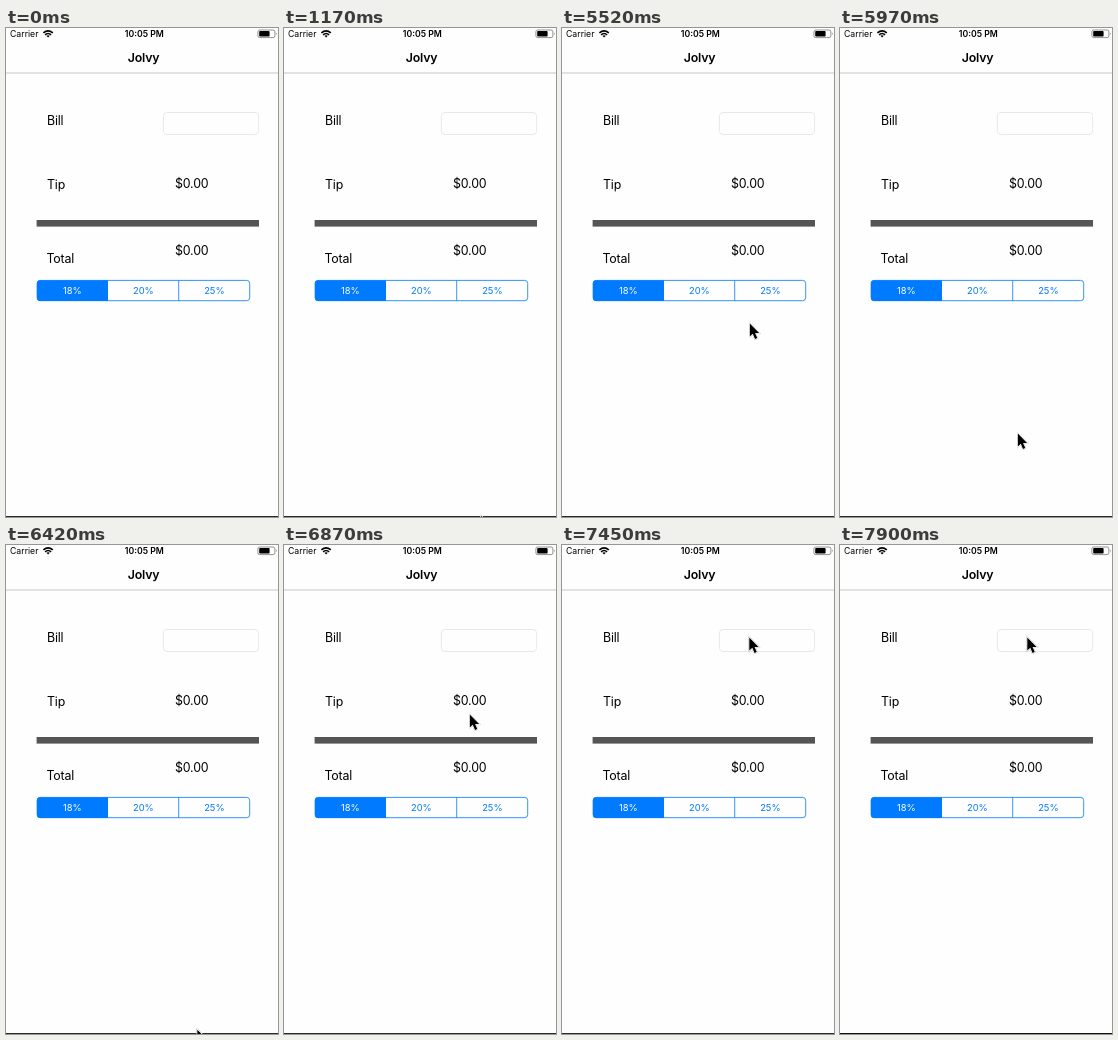
These frames come from a looping animation (272x489 px, 8000 ms). An HTML page:

```html
<!DOCTYPE html>
<html lang="en">
<head>
<meta charset="utf-8">
<title>Tip calculator</title>
<style>
  html, body { margin: 0; width: 100%; height: 100%; overflow: hidden; background: #fefefe; }
  svg { display: block; font: 12.4px Inter, Roboto, sans-serif; letter-spacing: -.18px; }
  .status { font-size: 8.7px; letter-spacing: 0; }
  .bold { font-weight: 600; }
  .mid { text-anchor: middle; }
  .segments { font-size: 9.4px; letter-spacing: 0; fill: #007aff; }
</style>
</head>
<body>
<svg width="272" height="489" viewBox="0 0 272 489">
  <rect width="272" height="489" fill="#fefefe"/>
  <rect y="44.5" width="272" height="1" fill="#c8c8c8"/>

  <g class="status">
    <text x="4" y="9">Carrier</text>
    <text class="bold mid" x="138.3" y="9">10:05 PM</text>
  </g>
  <g fill="none" stroke="#000" stroke-width="1.6">
    <path d="M37.4 4.9Q42.1 .8 46.8 4.9M39.1 6.8Q42.1 4.2 45.1 6.8"/>
    <path d="M40.4 7.8Q42.1 6.6 43.8 7.8L42.1 9.5Z" fill="#000" stroke="none"/>
  </g>
  <rect x="251.9" y="2" width="17" height="7.6" rx="1.8" fill="none" stroke="#777" stroke-width=".8"/>
  <rect x="253.2" y="3.1" width="10.4" height="5.4" rx=".8"/>
  <path d="M270 4.5q1.5 1.3 0 2.6z" fill="#777"/>

  <text class="bold mid" x="137.5" y="33.6">Jolvy</text>
  <text x="41" y="97">Bill</text>
  <text x="41" y="160.5">Tip</text>
  <text x="40.5" y="234.5">Total</text>
  <text x="169" y="159.8">$0.00</text>
  <text x="169" y="226.8">$0.00</text>
  <rect x="157.4" y="84.5" width="95.2" height="22" rx="3.6" fill="#fefefe" stroke="#e4e4e4" stroke-width=".8"/>
  <rect x="30.6" y="192" width="222.4" height="6.6" fill="#555"/>

  <g class="segments mid">
    <rect x="31.1" y="252.4" width="212.6" height="20.3" rx="3" fill="#fefefe" stroke="#007aff" stroke-width=".8"/>
    <path d="M102 252.2H34a3 3 0 0 0-3 3v14.7a3 3 0 0 0 3 3h68z"/>
    <path d="M172.7 252.4v20.3" stroke="#007aff" stroke-width=".8"/>
    <text x="66.3" y="266.2" fill="#fefefe">18%</text>
    <text x="137.4" y="266.2">20%</text>
    <text x="208.4" y="266.2">25%</text>
  </g>

  <rect id="edge" y="488" width="272" height="1"/>
  <path id="cursor" d="M1.8 .6V13.5L4.8 10.8 7 15.9 9.3 15 7.1 10H11.1Z"
        stroke="#fff" stroke-width="1.6" paint-order="stroke"
        style="filter:drop-shadow(0 .6px .7px #0008)"/>
</svg>
<script>
const LOOP = 8000, SAMPLE = 150;
// Each pass of the pointer runs through key points [ms, x, y] and leaves at its end.
const passes = [
  { end: 1620, keys: [[1170, 195, 487], [1470, 246, 488]] },
  { end: 6720, keys: [[5520, 186, 295], [5820, 186, 297], [5970, 176, 405], [6570, 190, 487]] },
  { end: LOOP, keys: [[6870, 184, 169], [7010, 186, 82], [7450, 185.5, 92]] }
];
const cursor = document.getElementById('cursor');
const edge = document.getElementById('edge');

const ease = u => u ** 3 / (u ** 3 + (1 - u) ** 3);

// The pointer glides between keys but is only seen at coarse samples.
function pointerAt(t) {
  const pass = passes.find(({ end, keys }) => t >= keys[0][0] && t < end);
  if (!pass) return null;
  const i = pass.keys.findLastIndex(key => key[0] <= t);
  const [start, x, y] = pass.keys[i];
  const [stop, nextX, nextY] = pass.keys[i + 1] ?? [Infinity, x, y];
  const elapsed = Math.floor((t - start) / SAMPLE) * SAMPLE;
  const k = ease(elapsed / (stop - start));
  return [x + (nextX - x) * k, y + (nextY - y) * k];
}

function draw(now) {
  const t = now % LOOP;
  const point = pointerAt(t);
  cursor.setAttribute('visibility', point ? 'visible' : 'hidden');
  if (point) cursor.setAttribute('transform', `translate(${point})`);
  edge.setAttribute('fill', t < 7900 ? '#2b2b2b' : '#111');
  requestAnimationFrame(draw);
}
draw(performance.now());
</script>
</body>
</html>
```
